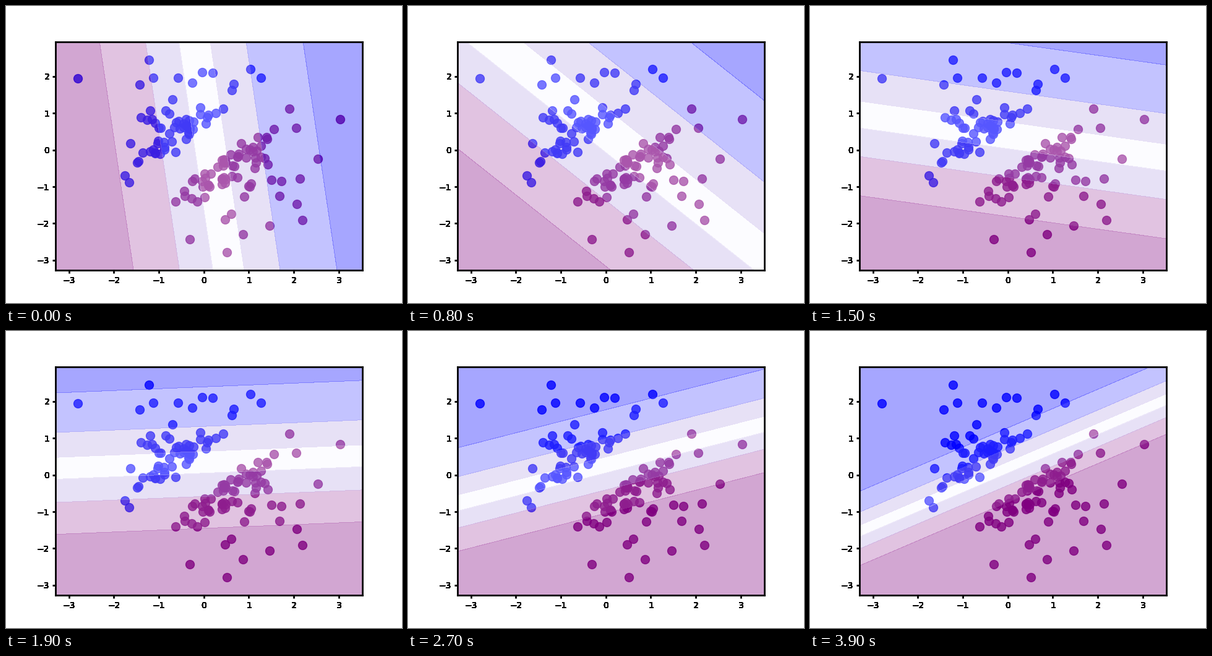
A matplotlib script that plays this animation: 640 by 480 pixels, repeating every 4000 ms.

```python
import numpy as np
import matplotlib.pyplot as plt
from matplotlib.animation import FuncAnimation

FRAMES, INTERVAL = 40, 100
XLIM, YLIM = (-3.30, 3.525), (-3.275, 2.948)
INK_PASSES = 24  # labels are drawn over themselves, which hardens their edges
LABEL_PAD = 7

# Outlying dots; the dense part of each class is random.
BLUE_RIM = [(-2.8, 1.95), (-1.22, 2.46), (-1.43, 1.78), (-1.13, 1.96),
            (-0.57, 1.96), (-0.04, 2.12), (0.19, 2.1), (0.66, 1.8),
            (1.04, 2.2), (1.27, 1.97), (-1.66, -0.88)]
PURPLE_RIM = [(3.03, 0.83), (2.53, -0.24), (1.9, 1.12), (2.05, 0.6),
              (2.14, -0.78), (2.19, -1.9), (2.06, -1.47), (1.46, -2.06),
              (0.87, -2.3), (0.51, -2.78), (-0.31, -2.43)]

# Probability bands from purple through white to blue.
LEVELS = np.arange(8) * 0.15
BANDS = ["#800080", "#aa55aa", "#bda9e8", "#f9f7ff", "#bda9e8",
         "#5555ff", "#0000ff"]

rng = np.random.default_rng(7)


def core(side, count):
    """Dots beside the diagonal, kept clear of it by a margin."""
    along = rng.normal(0.08, 0.52, count)
    gap = 0.54 + rng.gamma(1.7, 0.45, count)
    return np.column_stack([along - side * gap / 2, along + side * gap / 2])


def weights(step):
    """Classifier weights and bias after some training steps."""
    w1 = 0.8686 - 0.0484 * step
    w2 = 0.1056 + 0.0492 * step - 5.3e-5 * step ** 2
    bias = -0.0294 - 0.28 * (1 - np.exp(-step / 12))
    return w1, w2, bias


def write_labels(ticks, get_transform, place):
    transform, va, ha = get_transform(LABEL_PAD)
    for tick in ticks:
        label = str(tick).replace("-", "\u2212")
        for _ in range(INK_PASSES):
            ax.text(*place(tick), label, transform=transform, va=va, ha=ha)


fig, ax = plt.subplots(figsize=(6.4, 4.8), dpi=100)

for rim, side, count, color in ((BLUE_RIM, 1, 54, "blue"),
                                (PURPLE_RIM, -1, 64, "purple")):
    x, y = np.vstack([rim, core(side, count)]).T
    ax.scatter(x, y, s=100, c=color, alpha=0.8)

x_ticks, y_ticks = range(-3, 4), range(-3, 3)
ax.set(xlim=XLIM, ylim=YLIM, xticks=x_ticks, yticks=y_ticks)
ax.tick_params(width=2, labelbottom=False, labelleft=False)
for spine in ax.spines.values():
    spine.set_linewidth(2)
write_labels(x_ticks, ax.get_xaxis_text1_transform, lambda t: (t, 0))
write_labels(y_ticks, ax.get_yaxis_text1_transform, lambda t: (0, t))

gx, gy = np.meshgrid(np.linspace(*XLIM, 342), np.linspace(*YLIM, 312))
shown = []


def update(step):
    while shown:
        shown.pop().remove()
    w1, w2, bias = weights(step)
    chance = 1 / (1 + np.exp(-(w1 * gx + w2 * gy + bias)))
    shown.append(ax.contourf(gx, gy, chance, levels=LEVELS, colors=BANDS,
                             alpha=0.35, zorder=1.5))
    ax.set(xlim=XLIM, ylim=YLIM)
    return shown


anim = FuncAnimation(fig, update, frames=FRAMES, interval=INTERVAL,
                     repeat=True, repeat_delay=0, blit=False)
plt.show()
```
